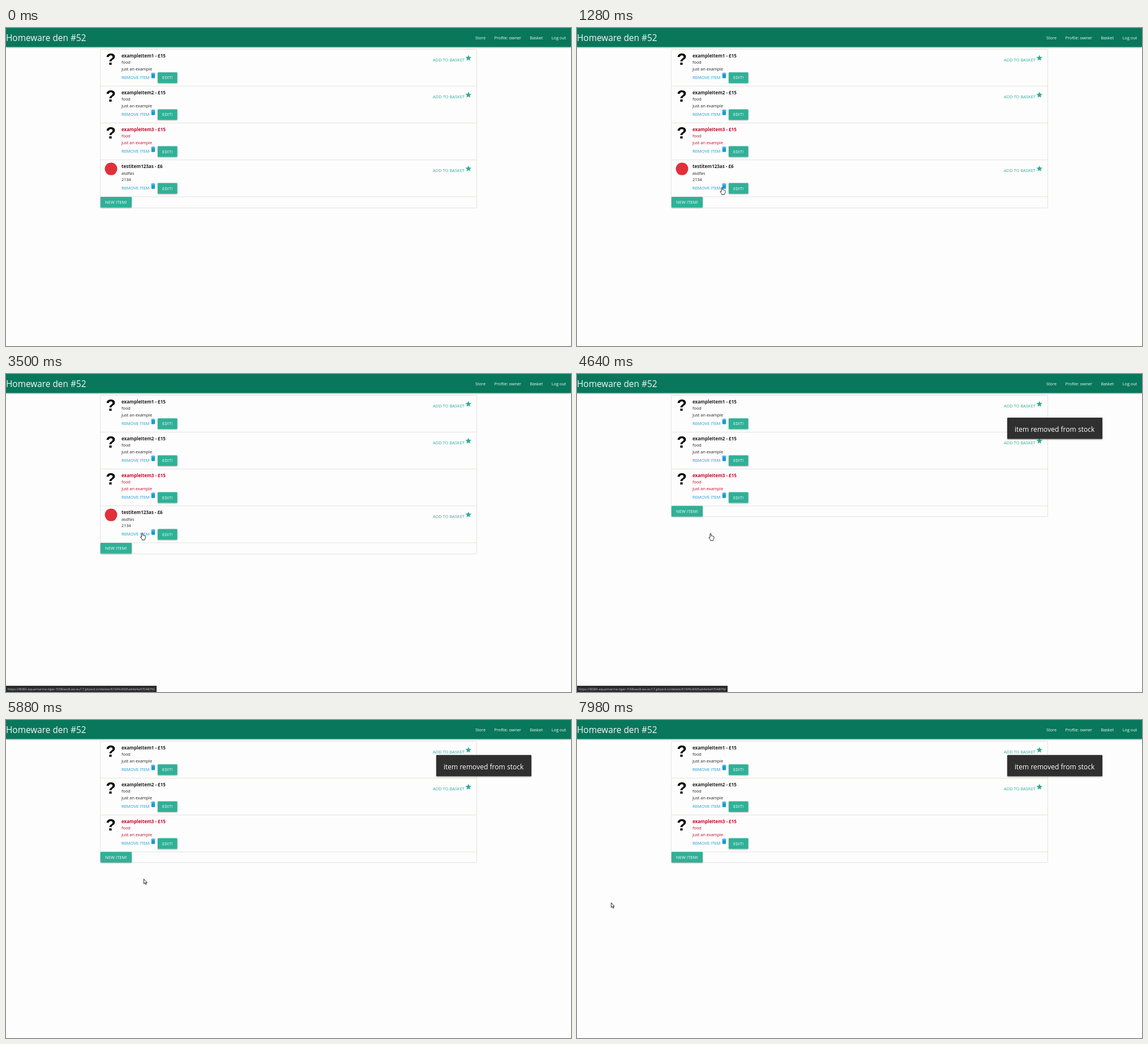
Recreate the animation shown at these times as an HTML page. Size 998 by 561 pixels, loop 8000 ms.

```html
<!DOCTYPE html>
<html lang="en">
<head>
<meta charset="utf-8">
<title>Shop stock list</title>
<style>
  html, body { margin: 0; width: 100%; height: 100%; overflow: hidden; background: #fdfdfd; }
  svg { display: block; font: 7.35px "Open Sans", "Noto Sans", sans-serif; fill: #222; }
  .nav { fill: #f4faf7; }
  .brand { font-size: 15.4px; }
  .line { fill: none; stroke: #e2e2de; }
  .mark { font: bold 29px "Liberation Sans", sans-serif; fill: #000; text-anchor: middle; }
  .name { font-size: 8px; font-weight: 700; }
  .sold { fill: #c4082b; }
  .remove { font-size: 7.55px; fill: #1a9ad6; }
  .add { font-size: 7.53px; fill: #2fab94; }
  .button { fill: #2fb197; filter: drop-shadow(0 1px 1px #0005); }
  .caption { font-size: 7.2px; letter-spacing: .26px; fill: #fff; }
  .toast { font-size: 12.07px; fill: #fff; }
  .status { font-size: 5.95px; fill: #c9cacc; }
  .cursor path { fill: #fff; stroke: #111; stroke-width: .9; stroke-linejoin: round; }
</style>
</head>
<body>
<svg width="998" height="561" viewBox="0 0 998 561">
  <defs>
    <path id="bin" transform="scale(.53)" d="M6 19c0 1.1.9 2 2 2h8c1.1 0 2-.9 2-2V7H6zM19 4h-3.5l-1-1h-5l-1 1H5v2h14z"/>
    <path id="star" transform="scale(.53)" d="M12 17.27L18.18 21l-1.64-7.03L22 9.24l-7.19-.61L12 2 9.19 8.63 2 9.24l5.46 4.73L5.82 21z"/>
  </defs>
  <rect width="998" height="561" fill="#fdfdfd"/>
  <g class="nav">
    <rect width="998" height="33.5" fill="#08775c" style="filter:drop-shadow(0 1px 1px #0005)"/>
    <text class="brand" x="0" y="23.3">Homeware den #52</text>
    <text x="829" y="19.6">Store</text>
    <text x="862.5" y="19.6">Profile: owner</text>
    <text x="925.5" y="19.6">Basket</text>
    <text x="963.7" y="19.6">Log out</text>
  </g>
  <g id="rows"></g>
  <rect id="frame" class="line" x="166.5" y="37.5" width="665" rx="1"/>
  <g id="newItem">
    <rect class="button" x="167" y="298" width="55" height="18.5" rx="1"/>
    <text class="caption" x="175" y="310">NEW ITEM!</text>
  </g>
  <g id="toast" class="toast">
    <rect x="760" y="61.7" width="168" height="37.5" rx="1" fill="#2f2f2f" style="filter:drop-shadow(0 1px 1px #0006)"/>
    <text x="773" y="87">item removed from stock</text>
  </g>
  <g id="status" class="status">
    <rect x="-1" y="550" width="267" height="12" fill="#292b2e"/>
    <text x="2.5" y="557.6">https://8080-aquamarine-tiger-5i58iwo8.ws-eu17.gitpod.io/delete/616f4c6fd5ab4e4a470487fd</text>
  </g>
  <g id="cursor" class="cursor">
    <path id="arrow" d="M.4.4V8.8L2.3 7.1 3.6 10 5 9.4 3.7 6.6H6.1Z"/>
    <path id="hand" d="M-1 7.8V1Q0-.6 1 1V4.6Q2 3.8 2.8 4.9 3.8 4.2 4.5 5.4 5.9 5 5.9 6.6V9Q5.6 10.6 4.7 11.3V12.8H-.2V11.5L-3 8.2Q-3 6.7-1.8 7.2Z"/>
  </g>
</svg>
<script>
const LOOP = 8000, REMOVED = 4640, TOAST_END = 5440;
const byId = id => document.getElementById(id);

const items = [
  ["exampleItem1 - £15", "food", "just an example"],
  ["exampleItem2 - £15", "food", "just an example"],
  ["exampleItem3 - £15", "food", "just an example", "sold"],
  ["testitem123as - £6", "asdfas", "2134"],
];

byId("rows").innerHTML = items.map(([name, kind, note, sold = ""], i) => `
  <g id="row${i}" transform="translate(0 ${i * 65.1})">
    ${i < 3 ? '<text class="mark" x="185" y="65">?</text>'
            : '<circle cx="185.5" cy="53.3" r="11" fill="#e0303a"/>'}
    <g class="${sold}">
      <text class="name" x="204" y="52">${name}</text>
      <text x="204" y="63.3">${kind}</text>
      <text x="204" y="74.7">${note}</text>
    </g>
    <g class="remove">
      <text x="204" y="89.6">REMOVE ITEM</text>
      <use href="#bin" x="253.6" y="77.4"/>
    </g>
    <rect class="button" x="268" y="78.3" width="34.5" height="18.7" rx="1"/>
    <text class="caption" x="276" y="90.4">EDIT!</text>
    ${sold ? "" : `<g class="add">
      <text x="754" y="58.5">ADD TO BASKET</text>
      <use href="#star" x="810.4" y="46.4"/>
    </g>`}
    <path class="line" d="M167 102.5H831"/>
  </g>`).join("");

// Pointer stops: time, x, y
const stops = [
  [20, 990, 300], [400, 811, 285], [700, 811, 285], [1280, 256, 281],
  [1420, 283, 282], [1520, 283, 282], [1820, 240.5, 280], [3500, 240.5, 280],
  [3570, 228, 282], [3640, 236, 281], [5460, 236, 281], [5720, 243, 280],
  [5880, 243, 280], [6600, 866, 86], [6700, 866, 86], [7440, 289, 284],
  [7540, 289, 284], [7980, 60, 322],
];

const clamp = v => Math.min(1, Math.max(0, v));
const progress = (t, from, to) => clamp((t - from) / (to - from));
const smooth = p => p * p * (3 - 2 * p);
const show = (id, visible) => byId(id).setAttribute("visibility", visible ? "visible" : "hidden");
const move = (id, x, y) => byId(id).setAttribute("transform", `translate(${x} ${y})`);

function pointerAt(t) {
  const next = stops.findIndex(s => s[0] > t);
  if (next < 0) return stops.at(-1).slice(1);
  if (next === 0) return stops[0].slice(1);
  const [t0, x0, y0] = stops[next - 1], [t1, x1, y1] = stops[next];
  const p = smooth(progress(t, t0, t1));
  return [x0 + (x1 - x0) * p, y0 + (y1 - y0) * p];
}

function draw(t) {
  const removed = t >= REMOVED;
  show("row3", !removed);
  byId("frame").setAttribute("height", removed ? 214 : 280);
  move("newItem", 0, removed ? -65.2 : 0);

  show("toast", removed);
  move("toast", 0, 15.3 * (1 - progress(t, REMOVED, TOAST_END)) ** 3);

  byId("status").setAttribute("opacity", progress(t, 2080, 2240) - progress(t, 5460, 5600));

  const [x, y] = pointerAt(t);
  const overLink = t < 5460 && x < 303;
  move("cursor", x, y);
  show("arrow", t >= 20 && !overLink);
  show("hand", t >= 20 && overLink);
}

const start = performance.now();
function tick() {
  draw((performance.now() - start) % LOOP);
  requestAnimationFrame(tick);
}
tick();
</script>
</body>
</html>
```
